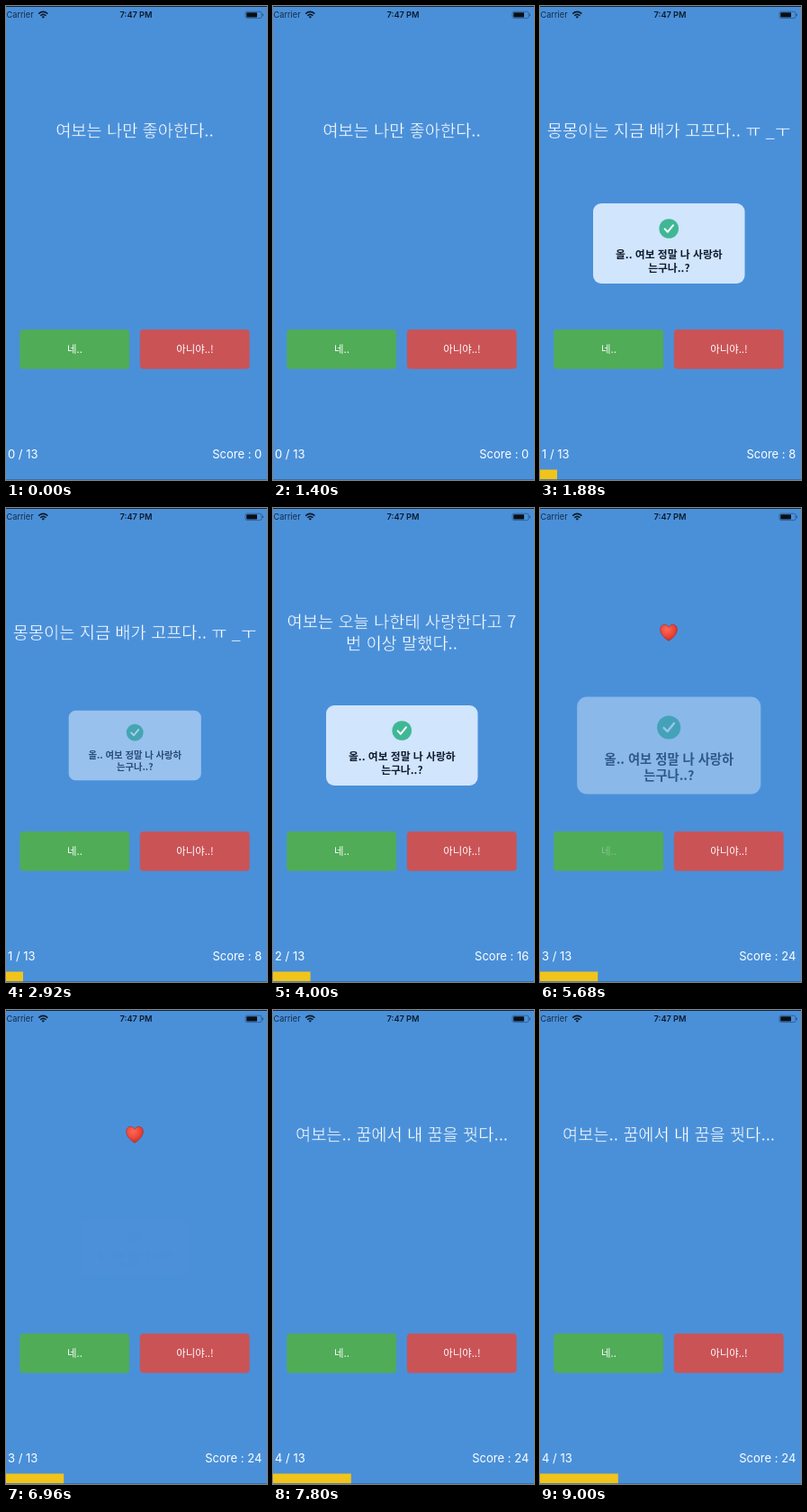
Write an HTML page that moves like this. It is 290 by 526 pixels and loops after 9.04 s.

```html
<!DOCTYPE html>
<html lang="ko">
<head>
<meta charset="utf-8">
<title>Quiz</title>
<style>
  html, body { margin: 0; width: 100%; height: 100%; overflow: hidden; background: #4a90d9; }
  svg { display: block; width: 290px; height: 526px; }
  text { font-family: Inter, "Noto Sans CJK KR", "Noto Sans CJK", sans-serif; }
  .ko { font-family: "Noto Sans CJK KR", "Noto Sans CJK", sans-serif; text-anchor: middle; }
  /* the background-coloured outline thins the strokes */
  .question { font-size: 18.7px; font-weight: 300; fill: #fff; stroke: #4a90d9; stroke-width: .4px; }
  .label { font-size: 11.4px; font-weight: 500; fill: #fff; }
  .note { font-size: 11.8px; font-weight: 600; fill: #101b2e; }
  .count { font-size: 13px; fill: #fff; }
  .status { font-size: 9.2px; fill: #152b45; }
  .glow { fill: none; stroke-width: 1.4px; stroke-opacity: .45; }
</style>
</head>
<body>
<svg viewBox="0 0 290 526">
  <defs>
    <radialGradient id="red" cx=".4" cy=".3" r=".75">
      <stop offset="0" stop-color="#fb6a58"/>
      <stop offset=".6" stop-color="#ea4435"/>
      <stop offset="1" stop-color="#c42a26"/>
    </radialGradient>
  </defs>
  <rect width="290" height="526" fill="#4a90d9"/>
  <rect width="290" height="1" fill="#14263a"/>
  <rect y="525" width="290" height="1" fill="#3b6fa8"/>

  <text class="status" x="0.6" y="12.8">Carrier</text>
  <g fill="none" stroke="#0d1a2a" stroke-width="1.5">
    <path d="M36.2 8.6Q41.2 4.2 46.4 8.6"/>
    <path d="M38.2 10.7Q41.3 8 44.5 10.7"/>
  </g>
  <path d="M39.6 12L41.3 13.8L43 12Q41.3 10.7 39.6 12Z" fill="#0d1a2a"/>
  <text class="status" x="144.5" y="12.9" text-anchor="middle" font-weight="600" style="fill:#0d1a2a">7:47 PM</text>
  <rect x="266" y="6.2" width="18" height="7.4" rx="1.8" fill="none" stroke="#2c5684" stroke-width=".8"/>
  <rect x="267.2" y="7.3" width="11.8" height="5.2" rx=".8" fill="#0a0f16"/>
  <rect x="284.8" y="8.6" width="1.2" height="2.6" rx=".6" fill="#2c5684"/>

  <text class="ko question" id="line1" x="143"></text>
  <text class="ko question" id="line2" x="143" y="156.5"></text>
  <path id="heart" fill="url(#red)" stroke="#a82a2a" stroke-width=".6"
    d="M143 147.4C138.5 144.6 133.6 140.2 133.6 134.8C133.6 131.4 135.8 129.4 138.4 129.4C140.6 129.4 142.2 130.6 143 132.4C143.8 130.6 145.4 129.4 147.6 129.4C150.2 129.4 152.4 131.4 152.4 134.8C152.4 140.2 147.5 144.6 143 147.4Z"/>

  <rect x="15.3" y="359" width="121.8" height="43.8" rx="4" fill="#50ac57"/>
  <rect class="glow" x="15.3" y="359" width="121.8" height="43.8" rx="4" stroke="#4d9f96"/>
  <rect x="148.9" y="359" width="121.8" height="43.8" rx="4" fill="#ca5356"/>
  <rect class="glow" x="148.9" y="359" width="121.8" height="43.8" rx="4" stroke="#8f6f98"/>
  <text class="ko label" id="yes" x="76.5" y="385">네..</text>
  <text class="ko label" id="no" x="210" y="385">아니야..!</text>

  <text class="count" id="step" x="2" y="501.7"></text>
  <text class="count" id="score" x="284.3" y="501.7" text-anchor="end"></text>
  <rect id="bar" y="514.5" height="10.7" fill="#f0c41b"/>

  <g id="hud">
    <rect x="59" y="219" width="168.5" height="89" rx="9" fill="#d1e5fc"/>
    <circle cx="143.2" cy="247" r="10.8" fill="#3fb795"/>
    <path d="M138.6 247.4L141.9 250.7L147.9 243.3" fill="none" stroke="#fff" stroke-width="2" stroke-linecap="round" stroke-linejoin="round"/>
    <text class="ko note" x="143.3" y="280.4">올.. 여보 정말 나 사랑하</text>
    <text class="ko note" x="143.3" y="295.4">는구나..?</text>
  </g>
</svg>
<script>
const LOOP = 9040, FADE = 150, HOLD = 1180, PRESS = 80, RELEASE = 200;

const pages = [
  { at: 0, score: 0, lines: ['여보는 나만 좋아한다..'] },
  { at: 1705, score: 8, lines: ['몽몽이는 지금 배가 고프다.. ㅠ _ㅜ'], tap: 'yes' },
  { at: 3680, score: 16, lines: ['여보는 오늘 나한테 사랑한다고 7', '번 이상 말했다..'], tap: 'yes' },
  { at: 5640, score: 24, lines: [], tap: 'yes' },
  { at: 7540, score: 24, lines: ['여보는.. 꿈에서 내 꿈을 꿧다...'], tap: 'no' }
];

const $ = id => document.getElementById(id);
const clamp = v => Math.min(1, Math.max(0, v));
const easeOut = v => 1 - (1 - clamp(v)) ** 2;
const easeInOut = v => clamp(v) ** 2 * (3 - 2 * clamp(v));
let shown = -1;

function showPage(i) {
  if (i === shown) return;
  shown = i;
  const { lines, score } = pages[i];
  $('line1').textContent = lines[0] || '';
  $('line2').textContent = lines[1] || '';
  $('line1').setAttribute('y', lines[1] ? 132.5 : 144.8);
  $('heart').style.display = lines.length ? 'none' : '';
  $('step').textContent = `${i} / 13`;
  $('score').textContent = `Score : ${score}`;
  $('bar').setAttribute('width', i ? i * 22.6 - 3.6 : 0);
}

function labelAlpha(id, t) {
  return pages.reduce((alpha, { at, tap }) => {
    if (tap !== id || t < at - PRESS) return alpha;
    return 0.2 + 0.8 * easeInOut((t - at) / RELEASE);
  }, 1);
}

function drawHud(age) {
  const enter = easeOut(age / FADE);
  const leave = easeOut((age - HOLD) / FADE);
  const scale = 1 + 0.4 * (1 - enter) - 0.3 * leave;
  $('hud').setAttribute('opacity', enter * (1 - leave));
  $('hud').setAttribute('transform',
    `translate(143.3 263.5) scale(${scale}) translate(-143.3 -263.5)`);
}

function render(t) {
  const i = pages.findLastIndex(p => t >= p.at);
  showPage(i);
  for (const id of ['yes', 'no']) $(id).setAttribute('opacity', labelAlpha(id, t));
  drawHud(pages[i].tap === 'yes' ? t - pages[i].at : -1);
}

const start = performance.now();
function tick() {
  render((performance.now() - start) % LOOP);
  requestAnimationFrame(tick);
}
tick();
</script>
</body>
</html>
```
